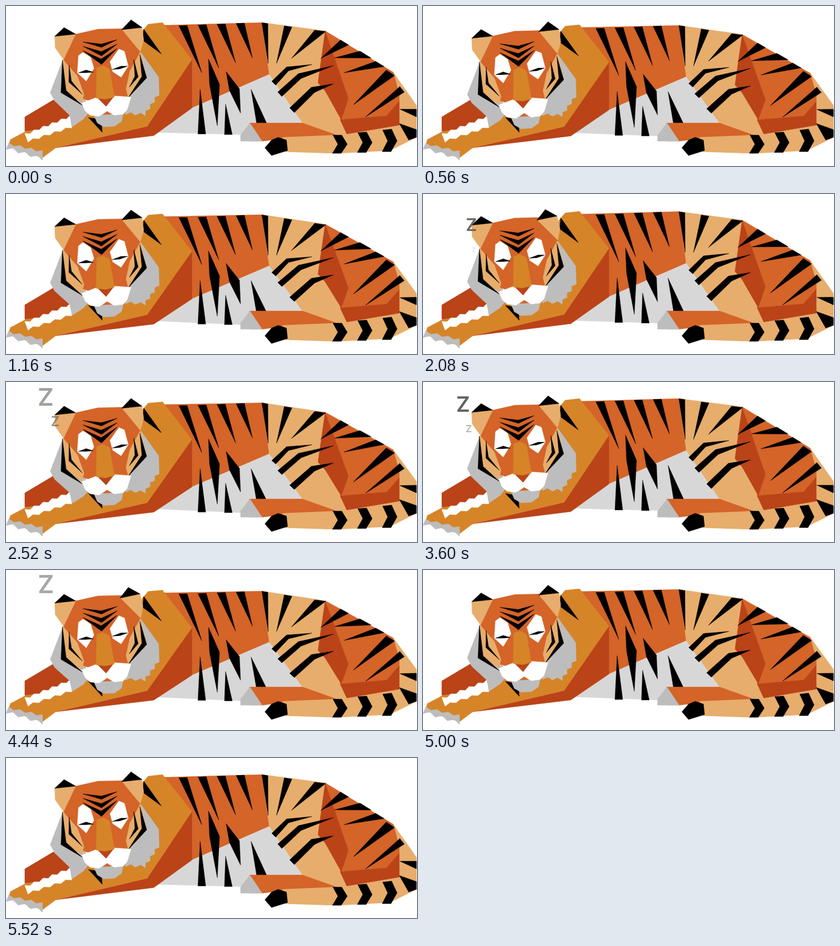
Recreate the animation shown at these times as an HTML page with a canvas. Size 743 by 290 pixels, loop 5760 ms.

```html
<!DOCTYPE html>
<html lang="en">
<head>
<meta charset="utf-8">
<title>Sleeping tiger</title>
<style>
  html, body { margin: 0; width: 100%; height: 100%; overflow: hidden; background: #fff; }
  canvas { display: block; width: 743px; height: 290px; }
</style>
</head>
<body>
<canvas id="stage" width="743" height="290"></canvas>
<script>
const ctx = document.getElementById('stage').getContext('2d');

const LOOP = 5760, FIRST = 80, STEP = 60.44, REST = 5520;
const ORANGE = '#d46428', RUST = '#ba4318', OCHRE = '#d68428', TAN = '#e7ad6c',
      GREY = '#bdbdbd', BELLY = '#d8d7d7', WHITE = '#fff', BLACK = '#000';

const BREATHS = [0, 1800, 3600, REST];
const Z_COUNT = 4, Z_START = 1420, Z_GAP = 640, Z_LIFE = 1260;

const clamp = v => Math.max(0, Math.min(1, v));
const range = n => [...Array(n).keys()];
const points = text => text.split(' ').map(p => p.split(',').map(Number));

// ---- motion ----

// 0 = chest full, 1 = breathed out
function breath(t) {
  const i = BREATHS.findIndex(end => t < end);
  if (i < 1) return 0;
  const start = BREATHS[i - 1];
  return 0.5 - 0.5 * Math.cos(2 * Math.PI * (t - start) / (BREATHS[i] - start));
}

const bump = (t, mid, half) =>
  Math.abs(t - mid) < half ? 0.5 + 0.5 * Math.cos(Math.PI * (t - mid) / half) : 0;

// How far a body point sinks during a full breath
function sink(x, y) {
  const top = 6 + 2.7 * clamp((x - 260) / 80) + 2.5 * clamp((x - 463) / 114)
    - 7 * clamp((x - 577) / 123) - 4 * clamp((x - 700) / 42);
  const front = 1 - 0.5 * ((y - 30) / 203) ** 2;
  const rear = Math.max(0, 1 - ((y - 30) / 180) ** 2);
  const mix = clamp((x - 440) / 60);
  const arm = 1 - (1 - clamp((x - 230) / 106)) * clamp((y - 60) / 110);
  return top * arm * (front + (rear - front) * mix);
}

// ---- shapes ----

// Triangle whose base has the given length and slope
function wedge(x, y, length, slope, tipX, tipY) {
  const dx = Math.cos(slope) * length / 2, dy = Math.sin(slope) * length / 2;
  return [[x - dx, y - dy], [x + dx, y + dy], [tipX, tipY]];
}

// Stripe from a foot over an elbow to a pointed tip
function bent(foot, footWidth, elbow, elbowWidth, tip) {
  const side = ([x, y], [x1, y1], [x2, y2], width) => {
    const k = width / 2 / Math.hypot(x2 - x1, y2 - y1);
    const dx = (y1 - y2) * k, dy = (x2 - x1) * k;
    return [[x + dx, y + dy], [x - dx, y - dy]];
  };
  const [f1, f2] = side(foot, foot, elbow, footWidth);
  const [e1, e2] = side(elbow, foot, tip, elbowWidth);
  return [f1, e1, tip, e2, f2];
}

// Saw-toothed edge, teeth to the left of the direction of travel
function zigzag([x1, y1], [x2, y2], teeth, depth) {
  const len = Math.hypot(x2 - x1, y2 - y1);
  return range(2 * teeth + 1).map(i => {
    const k = i / (2 * teeth), d = i % 2 ? depth / len : 0;
    return [x1 + (x2 - x1) * k + (y2 - y1) * d, y1 + (y2 - y1) * k - (x2 - x1) * d];
  });
}

function painter(move) {
  return (color, ...shapes) => {
    ctx.fillStyle = ctx.strokeStyle = color;
    ctx.lineWidth = 0.5;
    for (const shape of shapes) {
      const outline = typeof shape === 'string' ? points(shape) : shape;
      ctx.beginPath();
      outline.forEach(([x, y]) => ctx.lineTo(...move(x, y)));
      ctx.closePath();
      ctx.fill();
      ctx.stroke();
    }
  };
}

// ---- tiger ----

function drawBody(fill) {
  fill(ORANGE, '283,35 463,30 476,124 336,185 300,180');
  fill(BELLY, '336,185 476,124 536,212 440,213 425,233 270,229');
  fill(TAN, '463,30 577,45 580,150 606,206 616,232 596,235 536,212 476,124',
    '700,120 742,180 742,238 694,262 600,267 510,264 500,238 600,234 711,216 711,165');
  fill(ORANGE, '577,45 700,120 711,160 711,172 688,199 604,206 619,167');
  fill(RUST, '577,45 619,167 606,206 577,154 564,139', '604,206 688,199 711,172 711,216 616,232');

  // back and belly
  fill(BLACK,
    ...range(4).map(i => wedge(320 + 34.5 * i, 35.5 - 1.4 * i, 15, -0.04, 354 + 30.5 * i, 121 - 9 * i)),
    wedge(468, 31, 11, 0.15, 474, 104),
    '366,96 386,142 382,217 368,142',
    '398,119 422,150 424,194 404,153',
    wedge(354, 232, 14, 0, 351, 151),
    wedge(402, 233, 14, 0, 397, 178),
    wedge(462, 212, 18, 0, 443, 151));

  // flank
  fill(BLACK,
    wedge(510, 37, 14, 0.15, 489, 104),
    wedge(568, 45, 20, 0.13, 516, 95),
    bent([484, 140], 10, [509, 114], 8, [553, 106]),
    bent([495, 160], 11, [531, 127], 10, [592, 108]),
    bent([517, 189], 12, [555, 152], 11, [592, 141]));

  // hip and rump
  fill(BLACK,
    wedge(612, 66, 17, 0.55, 569, 95),
    wedge(650, 88, 24, 0.55, 594, 94),
    wedge(676, 105, 18, 0.55, 611, 121),
    wedge(695, 121, 18, 0.6, 628, 179),
    wedge(716, 151, 13, 0.9, 650, 201),
    wedge(742, 194, 14, Math.PI / 2, 712, 187),
    '711,213 742,224 742,238 728,243');
}

function drawLegAndTail(fill) {
  fill(ORANGE, '440,212 536,212 598,234 502,240 464,245 440,245');
  fill(GREY, '441,212 463,245 424,245 424,234');
  fill(TAN, '500,238 598,234 600,267 505,264');
  fill(BLACK, '468,257 480,243 492,238 507,243 509,262 480,271',
    ...range(3).map(i => {
      const x = 591 + 45 * i, top = 234 - 4.5 * i, bottom = 267 - 1.5 * i, mid = (top + bottom) / 2;
      return [[x, top], [x + 16, top - i], [x + 26, mid], [x + 15, bottom], [x - 1, bottom], [x + 9, mid]];
    }));
}

function drawForequarters(fill, fixed) {
  fill(RUST, '336,97 336,185 267,235 90,257 255,218');
  fill(OCHRE, '246,46 257,33 283,30 336,97 255,218 90,257 66,275 4,255 8,242 40,225 150,190 230,120');
  fill(BLACK, '249,42 281,87 247,62', '149,202 172,206 174,229');

  fixed(RUST, '34,201 86,170 122,200 118,215 34,227');
  fixed(WHITE, [
    ...zigzag([34, 231], [116, 198], 5, -4),
    ...zigzag([119, 221], [40, 247], 4, -4)]);
  fixed(GREY, [
    ...zigzag([5, 248], [66, 262], 3, -4),
    ...zigzag([66, 280], [0, 260], 3, -6)]);
}

function drawHead(drop, twitch) {
  const fill = painter((x, y) => [x, y + drop]);
  const ruff = painter((x, y) => [x, y + drop * clamp((230 - y) / 60)]);

  ruff(GREY, '103,97 80,157 88,172 115,198 120,219 140,205 152,190 135,150',
    [[243, 83], [276, 129], ...zigzag([277, 162], [252, 199], 3, -5),
      ...zigzag([252, 199], [216, 197], 2, -5), [212, 160]]);
  fill(GREY, '159,198 185,190 212,194 209,209 196,218 177,219 165,212');

  fill(ORANGE, '126,51 166,42 210,41 244,82 224,166 180,182 139,168 104,97');
  fill(TAN, '103,97 129,127 141,160 137,176 103,152',
    '243,83 254,129 221,166 217,150 224,118',
    '88,55 126,51 104,97 89,76');
  fill(BLACK, '88,55 105,39 126,51');

  // right ear pivots about its base
  const c = Math.cos(0.1 * twitch), s = -Math.sin(0.1 * twitch);
  const ear = painter((x, y) => {
    const dx = x - 238, dy = y - 75;
    return [238 + dx * c - dy * s, 75 + dx * s + dy * c + drop];
  });
  ear(TAN, '210,43 246,39 249,62 243,83');
  ear(BLACK, '209,43 226,25 246,39');

  // forehead, then cheeks
  fill(BLACK,
    ...range(3).map(i =>
      bent([139, 65 + 8 * i], 0, [172.5, 72 + 14.5 * i], 6 + 2 * i, [201, 61 + 8 * i])),
    bent([102, 98], 0, [104, 155], 10, [138, 180]),
    bent([114, 107], 0, [116, 137], 5, [138, 160]),
    bent([242, 88], 0, [250, 129], 9, [221, 166]),
    bent([231, 97], 0, [236, 128], 6, [223, 147]));

  fill(WHITE, '131,90 139,84 153,93 159,113 145,136 129,121',
    '188,101 204,78 214,82 221,109 208,129 193,119');
  fill(BLACK, '131,121 145,116 158,120 144,121', '192,115 208,109 220,109 206,114');

  fill(WHITE, '137,176 163,166 196,163 226,165 219,188 212,196 196,198 182,191 168,200 152,198 143,190');
  fill(RUST, '164,165 195,164 181,182');
  fill(OCHRE, '164,112 175,108 187,114 196,165 180,169 163,167');
  fill(ORANGE, '175,197 183,191 191,196');
}

function drawZ(age) {
  if (age < 0 || age > Z_LIFE) return;
  const cap = 7 + 0.0235 * age;
  const x = 93 - 0.0165 * age - 7 * Math.sin(2 * Math.PI * age / 760);
  const y = 102 - 0.07 * age;
  ctx.globalAlpha = clamp(0.2 + age / 850) * clamp((Z_LIFE - age) / 300);
  ctx.fillStyle = '#67625e';
  ctx.font = `600 ${cap / 0.727}px Inter, "DejaVu Sans", sans-serif`;
  ctx.textAlign = 'center';
  ctx.fillText('Z', x, y + cap / 2);
  ctx.globalAlpha = 1;
}

function draw(now) {
  const clock = now % LOOP;
  const t = clock < FIRST ? 0
    : Math.min(REST, FIRST + STEP * Math.floor((clock - FIRST) / STEP + 0.01));
  const b = breath(t);
  const body = painter((x, y) => [x, y + b * sink(x, y)]);
  const fixed = painter((x, y) => [x, y]);
  const twitch = Math.max(bump(t, 2080, 260), bump(t, 4440, 260));

  ctx.fillStyle = WHITE;
  ctx.fillRect(0, 0, 743, 290);
  drawBody(body);
  drawLegAndTail(fixed);
  drawForequarters(body, fixed);
  drawHead(5 * (t ? breath(t + 60) : 0), twitch);
  range(Z_COUNT).forEach(i => drawZ(t - Z_START - Z_GAP * i));
}

const start = performance.now();
function tick() {
  draw(performance.now() - start);
  requestAnimationFrame(tick);
}
tick();
</script>
</body>
</html>
```
